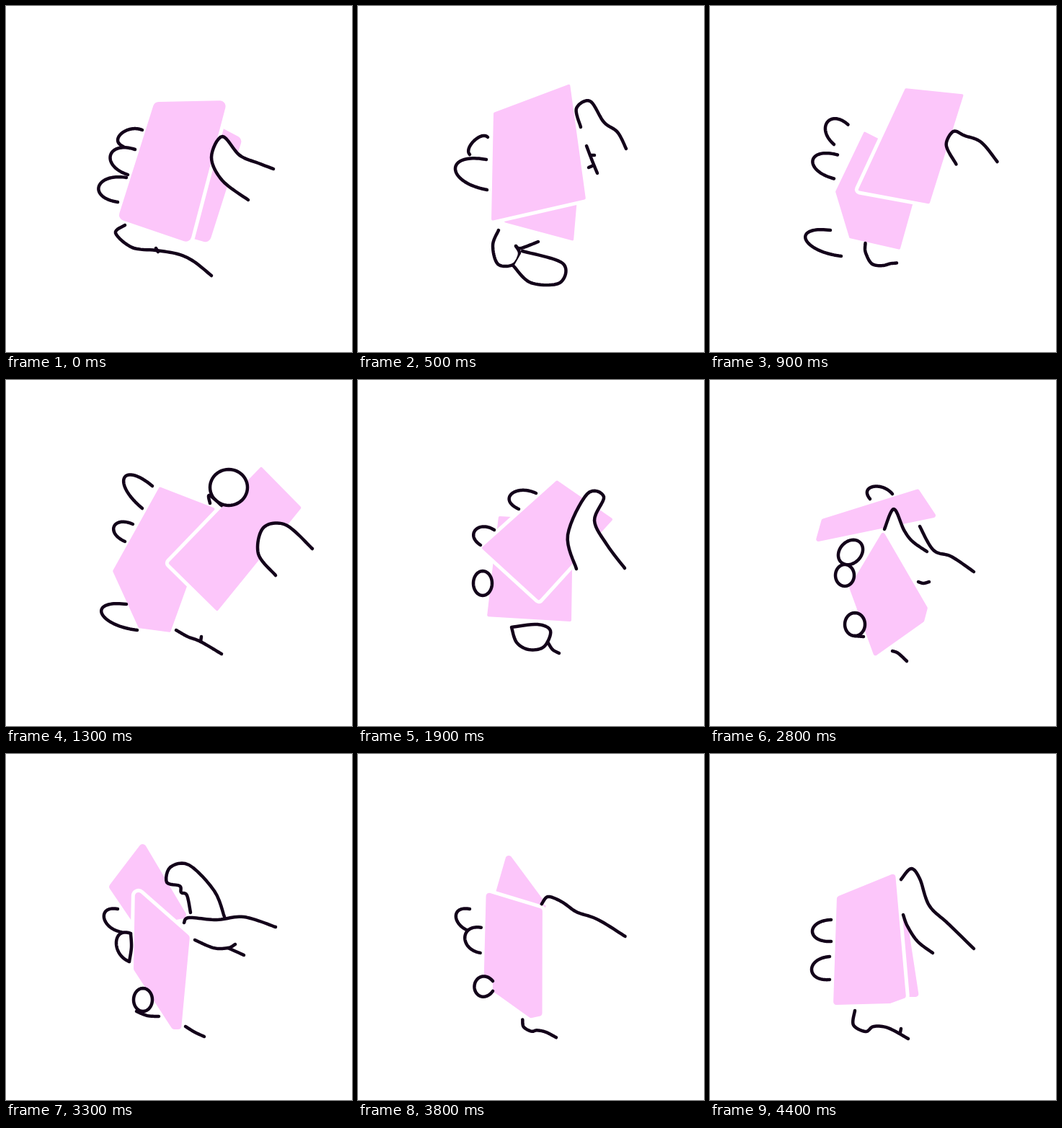
An HTML page with a canvas that plays this animation: 480 by 480 pixels, repeating every 4.5 s.

```html
<!DOCTYPE html>
<html lang="en">
<head>
<meta charset="utf-8">
<title>Shuffling cards</title>
<style>
  html, body { margin: 0; width: 100%; height: 100%; overflow: hidden; background: #fff; }
  canvas { display: block; width: 480px; height: 480px; }
</style>
</head>
<body>
<canvas id="stage" width="480" height="480"></canvas>
<script>
const ctx = document.getElementById('stage').getContext('2d');
const INK = '#13031a', PINK = '#fcc6fa';
const LOOP = 4500, SAMPLES = 48, LIFT = 20;

const mix = (p, q, k) => p + (q - p) * k;
const blend = (from, to, k) => from.map((p, i) => p.map((v, d) => mix(v, to[i][d], k)));
const quad = s => s.split(' ').map(p => p.split(',').map(Number));
const sample = f => Array.from({ length: SAMPLES + 1 }, (_, i) => f(i / SAMPLES));

// Fingertip: a U from start to end whose middle touches the tip
function hook(s) {
  const [start, tip, end] = quad(s);
  return sample(t => [0, 1].map(d => {
    const reach = 4 * (tip[d] - (start[d] + end[d]) / 2);
    return start[d] * (1 - t) ** 2 * (1 + 2 * t) + end[d] * t * t * (3 - 2 * t) + reach * t * (1 - t);
  }));
}

function oval(x, y, rx, ry, tilt = 0) {
  const cos = Math.cos(tilt), sin = Math.sin(tilt);
  return sample(t => {
    const u = rx * Math.cos(2 * Math.PI * t), v = -ry * Math.sin(2 * Math.PI * t);
    return [x + u * cos - v * sin, y + u * sin + v * cos];
  });
}

// Catmull-Rom curve through a few points
function curve(s) {
  const pts = quad(s), last = pts.length - 1;
  const at = i => pts[Math.min(last, Math.max(0, i))];
  return sample(t => {
    const i = Math.min(last - 1, Math.floor(t * last)), u = t * last - i;
    const [p, q, r, w] = [at(i - 1), at(i), at(i + 1), at(i + 2)];
    return [0, 1].map(d => q[d] + u / 2 * (r[d] - p[d] +
      u * (2 * p[d] - 5 * q[d] + 4 * r[d] - w[d] + u * (3 * (q[d] - r[d]) + w[d] - p[d]))));
  });
}

// Key poses: cards and the strokes of the hand. Cards a and b and the named
// strokes flow into the next pose; details belong to one pose only.
const poses = [
  { at: 0, top: 'a', round: 8,
    a: quad('206,133 307,131 255,329 155,295'),
    b: quad('250,143 328,184 282,329 250,320 220,312'),
    index: hook('189,172 160,177 163,195'),
    middle: hook('179,199 145,207 169,234'),
    ring: hook('167,238 129,250 155,272'),
    palm: curve('165,304 152,315 175,335 208,339 238,344 260,354 285,374'),
    thumb: curve('336,269 300,242 285,210 300,181 324,207 350,218 371,226'),
    details: [curve('208,336 211,341')] },
  { at: 4, top: 'a', round: 2,
    a: quad('188,148 294,108 316,268 185,298'),
    b: quad('215,200 305,255 299,326 203,300 200,250'),
    index: hook('180,182 161,187 155,206'),
    middle: hook('178,213 135,226 179,255'),
    palm: curve('195,311 187,332 194,358 215,359 224,344 219,333'),
    thumb: curve('309,168 303,142 322,132 341,161 360,175 372,198'),
    details: [curve('216,361 240,384 280,384 284,357 228,340'), curve('219,333 226,336 250,327'),
      curve('317,194 325,215 332,232'), curve('322,207 328,207'), curve('320,224 327,221')] },
  { at: 12, top: 'a', round: 2,
    a: quad('354,120 410,177 293,321 225,254'),
    b: quad('213,148 290,178 228,350 184,344 148,265'),
    index: hook('203,147 164,136 189,178'),
    middle: hook('176,200 150,203 165,224'),
    ring: hook('167,311 133,324 182,347'),
    palm: curve('236,347 252,356 270,363 299,380'),
    thumb: curve('374,271 350,241 357,205 388,201 425,234'),
    details: [oval(309, 149, 26, 25), curve('283,171 282,160 299,174'), curve('270,363 271,356')] },
  { at: 17, top: 'a', round: 2,
    a: quad('276,139 354,193 251,306 171,233'),
    b: quad('195,189 298,195 296,335 179,328 187,258'),
    index: hook('247,157 213,158 223,179'),
    middle: hook('189,208 163,208 170,229'),
    ring: oval(173, 282, 13, 17),
    palm: curve('213,343 249,339 267,348 258,370 237,374 220,364 213,343'),
    thumb: curve('303,262 291,215 318,158 341,162 328,195 345,228 370,261'),
    details: [curve('264,365 270,374 279,379')] },
  { at: 26, top: 'a', round: 3,
    a: quad('289,151 315,190 146,225 155,193'),
    b: quad('240,209 302,316 297,335 228,384 193,288'),
    index: hook('253,158 226,148 222,165'),
    middle: oval(195, 239, 19, 15, -0.8),
    ring: oval(201, 339, 14, 16),
    palm: curve('253,376 261,379 273,390'),
    thumb: curve('242,207 255,179 269,208 281,224 301,238'),
    details: [oval(187, 271, 13, 15), curve('291,203 310,236 335,245 366,266'),
      curve('289,280 296,282 304,280'), curve('200,355 213,356')] },
  { at: 31, top: 'b', round: 5,
    a: quad('190,121 253,227 180,240 142,184'),
    b: quad('179,186 255,253 243,382 231,382 177,299'),
    index: hook('155,215 136,227 160,247'),
    middle: hook('173,249 153,261 171,288'),
    ring: oval(190, 341, 13, 16),
    palm: curve('249,378 262,386 275,392'),
    thumb: curve('247,234 254,227 292,230 330,226 374,240'),
    details: [curve('303,226 289,190 254,154 228,157 223,178 241,183 243,192 251,196 256,220'),
      curve('173,249 174,268 171,288'), curve('181,357 196,363 212,364'),
      curve('262,258 288,269 308,269 318,264'), curve('308,269 330,279')] },
  { at: 42, top: 'b', round: 4,
    a: quad('230,200 274,232 290,337 230,337'),
    b: quad('176,198 257,165 272,338 250,346 171,348'),
    middle: hook('168,230 142,246 168,260'),
    ring: hook('166,281 141,299 166,313'),
    palm: curve('201,356 199,376 216,385 227,378 247,380 275,395'),
    thumb: curve('265,174 279,159 291,173 304,210 330,235 366,270'),
    details: [curve('268,223 274,239 288,260 309,276'), curve('264,386 265,381')] }
];
const STROKES = ['index', 'middle', 'ring', 'palm', 'thumb'];

function card(pts, r) {
  const n = pts.length, [p, q] = [pts[n - 1], pts[0]];
  ctx.beginPath();
  ctx.moveTo((p[0] + q[0]) / 2, (p[1] + q[1]) / 2);
  pts.forEach((c, i) => ctx.arcTo(...c, ...pts[(i + 1) % n], r));
  ctx.closePath();
  ctx.strokeStyle = '#fff';
  ctx.lineWidth = 10;
  ctx.stroke();
  ctx.fillStyle = PINK;
  ctx.fill();
}

function line(pts) {
  ctx.beginPath();
  pts.forEach(p => ctx.lineTo(...p));
  ctx.fillStyle = '#fff';
  ctx.fill();
  ctx.strokeStyle = INK;
  ctx.lineWidth = 4.5;
  ctx.stroke();
}

function draw(n) {
  let i = 0;
  while (i < poses.length - 2 && n >= poses[i + 1].at) i++;
  const from = poses[i], to = poses[i + 1];
  const t = (n - from.at) / (to.at - from.at);
  const k = t * t * (3 - 2 * t);
  const near = k < 0.5 ? from : to;
  const rise = LIFT * Math.sin(Math.PI * t);

  ctx.fillStyle = '#fff';
  ctx.fillRect(0, 0, 480, 480);
  for (const key of near.top === 'a' ? 'ba' : 'ab') {
    const pts = blend(from[key], to[key], k);
    card(key === 'a' ? pts.map(([x, y]) => [x, y - rise]) : pts, mix(from.round, to.round, k));
  }
  for (const key of STROKES) {
    const pts = from[key] && to[key] ? blend(from[key], to[key], k) : near[key];
    if (pts) line(pts);
  }
  if (Math.abs(k - 0.5) > 0.3) near.details.forEach(line);
}

// Ten drawings a second; the first and the thirteenth are held twice as long
function drawingAt(ms) {
  const s = Math.floor(ms % LOOP / 100);
  return Math.max(0, s - 1) - (s >= 14 ? 1 : 0);
}

ctx.lineCap = ctx.lineJoin = 'round';
const start = performance.now();
let shown = -1;
function tick() {
  const n = drawingAt(Math.max(0, performance.now() - start));
  if (n !== shown) draw(shown = n);
  requestAnimationFrame(tick);
}
tick();
</script>
</body>
</html>
```
